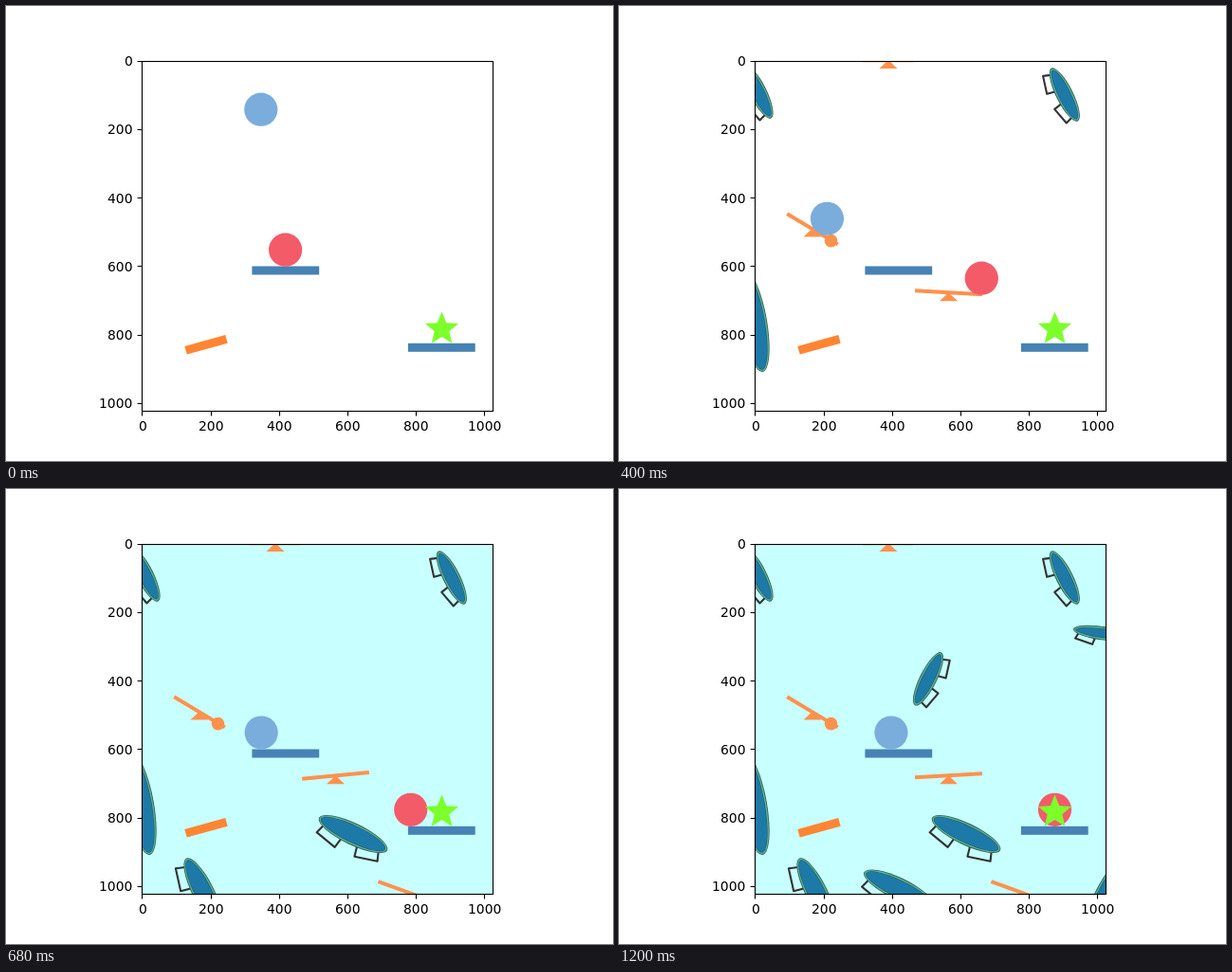
These frames come from a looping animation (640 px wide and 480 px high, 1240 ms). An HTML page:

```html
<!DOCTYPE html>
<html lang="en">
<head>
<meta charset="utf-8">
<title>Ball run</title>
<style>
html, body { margin: 0; width: 100%; height: 100%; overflow: hidden; background: #fff; }
svg { display: block; width: 640px; height: 480px; }
text { font: 13.89px "DejaVu Sans", sans-serif; fill: #000; }
.leg { fill: none; stroke: #333; stroke-width: 2.1; stroke-linejoin: round; }
.wood { fill: #ff914d; }
.plat { fill: #4682b4; }
</style>
</head>
<body>
<svg viewBox="0 0 640 480" xmlns="http://www.w3.org/2000/svg">
  <clipPath id="box"><rect x="143.5" y="58.5" width="370" height="369"/></clipPath>
  <g clip-path="url(#box)">
    <rect id="sky" x="143" y="57" width="371" height="371" fill="#c8ffff"/>
    <g id="props"></g>
    <rect class="plat" x="259.4" y="274.5" width="70.8" height="9"/>
    <rect class="plat" x="423.9" y="355.8" width="70.8" height="9"/>
    <rect x="-22.3" y="-4.5" width="44.6" height="9" fill="#ff8533" transform="translate(211 357.3) rotate(-15.5)"/>
    <circle id="blue" r="17.6" fill="#7aaddc"/>
    <circle id="red" r="17.6" fill="#f45b69"/>
    <path id="star" fill="#7cff2b"/>
  </g>
  <g id="axes" stroke="#000" stroke-width="1.11" fill="none">
    <rect x="143.5" y="58.5" width="370" height="369"/>
  </g>
  <g id="labels"></g>
</svg>
<script>
const STEP = 40, COUNT = 31;
const { round, floor, min, max, abs, sin, cos, PI } = Math;
const $ = id => document.getElementById(id);

// Axes: ticks and labels sit on whole pixels
let ticks = '', labels = '';
for (let n = 0; n <= 1000; n += 200) {
  const x = 143.38 + n * 0.36094, y = 57.78 + n * 0.36094;
  const width = 9 * String(n).length - 1.5;
  ticks += `M${round(x) + 0.5} 427.5v4.9M143.5 ${round(y) + 0.5}h-4.9`;
  labels += `<text x="${round(x - width / 2)}" y="448">${n}</text>` +
    `<text x="${round(132.95 - width)}" y="${round(y + 5.4)}">${n}</text>`;
}
$('axes').innerHTML += `<path d="${ticks}"/>`;
$('labels').innerHTML = labels;

// Star
let star = '';
for (let i = 0; i < 10; i++) {
  const r = i % 2 ? 8.2 : 18.4, a = i * PI / 5;
  star += (i ? 'L' : 'M') + (459.5 + r * sin(a)) + ' ' + (340.8 - r * cos(a));
}
$('star').setAttribute('d', star + 'Z');

// Props
function trampoline(x, y, angle, k = 1, ky = k) {
  const leg = s => `<path class="leg" d="M${s * 25 * k} ${4 * ky}L${s * 27.7 * k} ${11.6 * ky}` +
    `L${s * 9 * k} ${16.3 * ky}L${s * 7.3 * k} ${8 * ky}"/>`;
  const ring = (inset, color) =>
    `<ellipse rx="${31.2 * k - inset}" ry="${9 * ky - inset}" fill="${color}"/>`;
  return `<g transform="translate(${x} ${y}) rotate(${angle})">${leg(-1)}${leg(1)}` +
    ring(0, '#2f5f58') + ring(0.9, '#5ab497') + ring(2.3, '#255c66') + ring(3, '#1d7aa8') + '</g>';
}

const plank = (x, y, len, angle, id = '') => `<g transform="translate(${x} ${y})">` +
  `<rect id="${id}" class="wood" x="${-len / 2}" y="-2" width="${len}" height="4" transform="rotate(${angle})"/></g>`;
const wedge = (x, y) => `<path class="wood" d="M${x} ${y}l9.5 9h-19z"/>`;

// In order of appearance; the empty slot is the sky
const props = [
  plank(204, 235.3, 62.5, 31, 'ramp') + wedge(204, 234.6) + '<circle class="wood" cx="223.5" cy="247.6" r="6.8"/>',
  plank(347.5, 302.3, 71, 0, 'seesaw') + wedge(347.5, 302.3),
  trampoline(146.5, 90.5, 63.5),
  wedge(284, 57) + '<rect class="wood" x="257" y="57" width="53" height="2.2"/>',
  trampoline(469.8, 93.5, 63.5),
  trampoline(142, 332.5, 80, 1.74, 1.55),
  trampoline(366, 364, 25.5, 1.28),
  trampoline(208, 425.3, 63.5, 1.28),
  plank(425.8, 426.2, 71, 20),
  '',
  trampoline(509.8, 152.2, 8, 1, 0.8),
  trampoline(514.5, 426, -62, 1.28),
  trampoline(326, 200.3, -63.5),
  trampoline(294.5, 421.5, 25.5, 1.28)
];
$('props').innerHTML = props.map(p => `<g>${p}</g>`).join('');
const groups = [...$('props').children];

// Motion, with time counted in steps
function bluePos(n) {
  if (n <= 3) return [268.8, 109.2 + 13.6 * n * n];
  if (n > 12) return [267.8 + 1.37 * (n - 16), 257];
  const u = n - 4, up = 22 * u - 3.2 * u * u; // up the ramp and back
  return [232.7 - 0.79 * up, 234.5 - 0.61 * up];
}

function redPos(n) {
  if (n > 12) { // hops onto the lower platform, then rolls
    const hop = max(0, 1 - ((n - 14.6) / 1.8) ** 2);
    return [459.5 - 2.52 * (30 - n), 338.3 - 9.5 * hop];
  }
  const drop = min(30, 8 * max(0, n - 6) ** 2) + 6 * max(0, n - 10) ** 2;
  return [max(294.6, 305.8 + 12.75 * (n - 4)), 257.2 + drop];
}

const seesawTilt = n => 6.3 * min(1, max(0, (n - 4) / 12)) * sin((n - 19) * PI / 6);
const rampTilt = n => 31 + 4.5 * max(0, 1 - abs(n - 4) / 2);

function place(id, [x, y]) {
  $(id).setAttribute('cx', x);
  $(id).setAttribute('cy', y);
}

const show = (el, on) => { el.style.display = on ? '' : 'none'; };

function draw(n) {
  const shown = floor((n * STEP - 10) / 74);
  groups.forEach((g, i) => show(g, i <= shown));
  show($('sky'), shown >= props.indexOf(''));
  place('blue', bluePos(n));
  place('red', redPos(n));
  $('seesaw').setAttribute('transform', `rotate(${seesawTilt(n)})`);
  $('ramp').setAttribute('transform', `rotate(${rampTilt(n)})`);
}

const start = performance.now();
function tick() {
  draw(floor((performance.now() - start) / STEP) % COUNT);
  requestAnimationFrame(tick);
}
tick();
</script>
</body>
</html>
```
